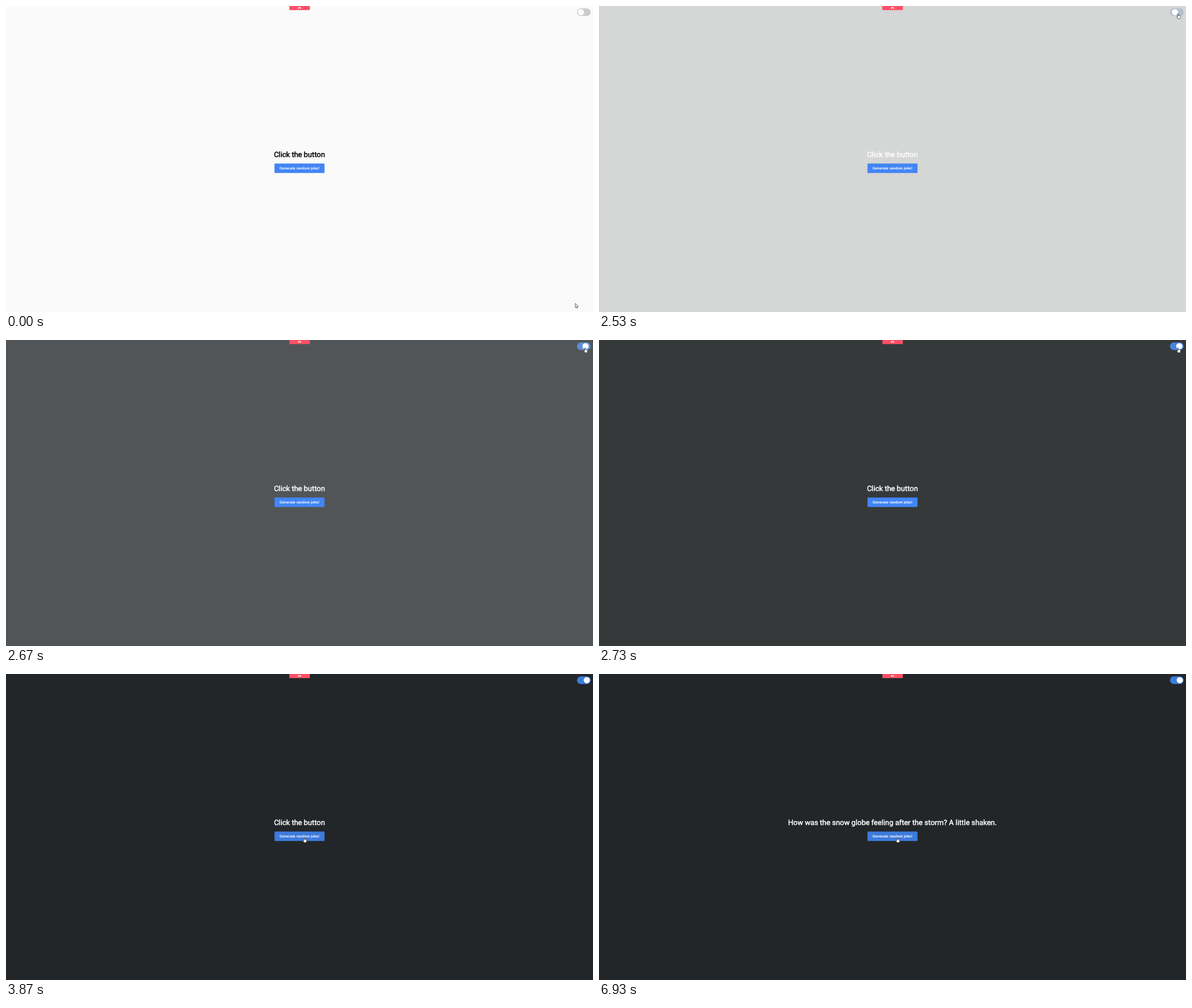
An HTML page that plays this animation: 1035 by 541 pixels, repeating every 8 s.

```html
<!DOCTYPE html>
<html lang="en">
<head>
<meta charset="utf-8">
<title>Random jokes</title>
<style>
  html, body { margin: 0; width: 100%; height: 100%; overflow: hidden; background: #fafafa; }
  svg { display: block; width: 1035px; height: 541px; }
  text { text-anchor: middle; text-rendering: geometricPrecision; }
  #title { font: 400 12.94px Roboto, sans-serif; stroke-width: .45px; }
  #label { font: 700 6.47px "Liberation Sans", Arial, sans-serif; fill: #fff; }
  #arrow path, #hand path { fill: #fff; stroke: #222; stroke-width: .7px; stroke-linejoin: round; }
</style>
</head>
<body>
<svg viewBox="0 0 1035 541">
  <rect id="page" width="1035" height="541"/>
  <path d="M499.5 0H535.8V5.4Q535.8 7.3 533.9 7.3H501.4Q499.5 7.3 499.5 5.4Z" fill="#fb5065"/>
  <path d="M515.3 4.9Q515.6 2.5 517.5 2.5T519.7 4.9" fill="none" stroke="#fff" stroke-width="1.3"/>
  <rect id="pill" x="1006.7" y="4.2" width="24.2" height="13.5" rx="6.75"/>
  <circle id="knob" cy="10.95" r="5.5" fill="#fff"/>
  <text id="title" x="517.4" y="266.8"></text>
  <rect id="button" x="473.4" y="278.5" width="88.2" height="16.8" rx="1.1"/>
  <text id="label" x="517.4" y="289.1">Generate random joke!</text>
  <g id="arrow"><path d="M.3 .3V7.6L2 6.1L3.1 8.7L4.4 8.1L3.3 5.6H5.5Z"/></g>
  <g id="hand"><path d="M-.7 .9Q-.7 .2 0 .2T.7 .9V3.4Q1.6 2.9 2 3.6Q2.9 3.2 3.2 3.9Q4.3 3.6 4.3 4.8V6.4Q4.2 8 3.4 9H-.3Q-1 7.6-2.2 6.2Q-2.4 5.2-1.5 5.2L-.7 6Z"/></g>
</svg>
<script>
const LOOP = 8000, STEP = 1000 / 15;
const FLIP = 2476, SHOWN = 2530, FADE = 400;
const JOKES = [
  [0, 'Click the button'],
  [5200, "Did you know the first French fries weren't really cooked in France? They were cooked in Greece."],
  [6930, 'How was the snow globe feeling after the storm? A little shaken.']
];
// Pointer keys: step, x, y
const TO_SWITCH = [[0, 1003.5, 525.5], [4, 840, 450], [8, 647, 290], [13, 822, 163.5], [18, 960, 60], [23, 1021, 13.5]];
const TO_BUTTON = [[44, 1021, 13.5], [50, 719, 163.5], [58, 525.8, 289]];

const el = id => document.getElementById(id);
const [page, pill, knob, title, button, arrow, hand] =
  ['page', 'pill', 'knob', 'title', 'button', 'arrow', 'hand'].map(el);

const mix = (a, b, p) => a + (b - a) * p;
const blend = (a, b, p) => `rgb(${a.map((v, i) => Math.round(mix(v, b[i], p)))})`;

// The CSS "ease" curve, cubic-bezier(.25, .1, .25, 1)
function ease(x) {
  if (x <= 0) return 0;
  if (x >= 1) return 1;
  const curve = (s, a, b) => 3 * s * (1 - s) ** 2 * a + 3 * s * s * (1 - s) * b + s ** 3;
  let lo = 0, hi = 1;
  for (let i = 0; i < 24; i++) {
    const mid = (lo + hi) / 2;
    if (curve(mid, .25, .25) < x) lo = mid; else hi = mid;
  }
  return curve(lo, .1, 1);
}

// Slope at a key: flat at the ends and at turning points
function slope(keys, i, axis) {
  const a = keys[i - 1], b = keys[i], c = keys[i + 1];
  if (!a || !c || (b[axis] - a[axis]) * (c[axis] - b[axis]) <= 0) return 0;
  return (c[axis] - a[axis]) / (c[0] - a[0]);
}

function along(keys, n, axis) {
  const last = keys.length - 1;
  if (n <= keys[0][0]) return keys[0][axis];
  if (n >= keys[last][0]) return keys[last][axis];
  const i = keys.findIndex(k => k[0] > n) - 1;
  const a = keys[i], b = keys[i + 1], span = b[0] - a[0], u = (n - a[0]) / span;
  const h = u * u * (3 - 2 * u);
  return mix(a[axis], b[axis], h)
    + span * u * (1 - u) * ((1 - u) * slope(keys, i, axis) - u * slope(keys, i + 1, axis));
}

const inside = (x, y, l, t, r, b) => x >= l && x <= r && y >= t && y <= b;

function draw(ms) {
  const n = Math.floor((ms + 4) / STEP);
  const dark = ms >= SHOWN;
  const p = dark ? ease((n * STEP - FLIP) / FADE) : 0;

  page.setAttribute('fill', blend([250, 250, 250], [34, 38, 40], p));
  pill.setAttribute('fill', blend([204, 204, 204], [59, 124, 220], p));
  knob.setAttribute('cx', mix(1013.7, 1024.1, p));

  const ink = dark ? '#fff' : '#000';
  const line = JOKES.filter(j => ms >= j[0]).pop()[1];
  if (title.textContent !== line) title.textContent = line;
  title.setAttribute('fill', ink);
  title.setAttribute('stroke', ink);

  const keys = n < 44 ? TO_SWITCH : TO_BUTTON;
  const x = along(keys, n, 1), y = along(keys, n, 2);
  const onButton = inside(x, y, 473.4, 278.5, 561.6, 295.3);
  const link = onButton || inside(x, y, 1006.7, 4.2, 1030.9, 17.7);
  button.setAttribute('fill', onButton ? '#3d7bdc' : '#4285f4');
  for (const [g, on] of [[arrow, !link], [hand, link]]) {
    g.setAttribute('transform', `translate(${x.toFixed(2)} ${y.toFixed(2)})`);
    g.setAttribute('visibility', on ? 'visible' : 'hidden');
  }
}

const start = performance.now();
function tick() {
  draw((performance.now() - start) % LOOP);
  requestAnimationFrame(tick);
}
tick();
</script>
</body>
</html>
```
